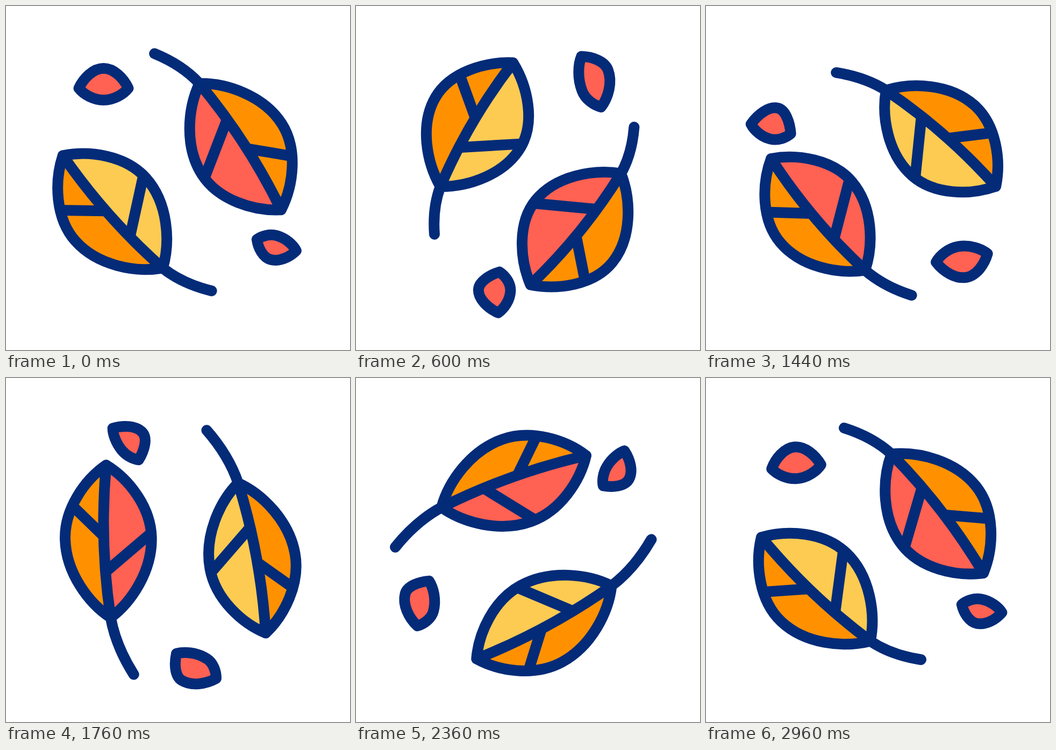
An HTML page for the animation above (3000 ms loop, 640x640 px).

```html
<!DOCTYPE html>
<html lang="en">
<head>
<meta charset="utf-8">
<title>Whirling leaves</title>
<style>
  html, body { margin: 0; width: 100%; height: 100%; overflow: hidden; background: #fff; }
  svg { display: block; width: 100%; height: 100%; }
  .line { fill: none; stroke: #042b78; stroke-width: 20; stroke-linejoin: round; }
  .round { stroke-linecap: round; }
</style>
</head>
<body>
<svg viewBox="-320 -320 640 640"><g id="wheel"></g></svg>
<script>
const LOOP = 3000, STEP = 40;
const RED = '#ff6152', ORANGE = '#ff9100', YELLOW = '#fdcb52';

// Sizes are measured from a shape's centre along its axis (tip, base) and
// to its two sides (near, far). A triple holds the values at each third of the loop.
const leafSize = {
  tip: [136, 132, 146], base: [144, 128, 142],
  near: [88, 94, 78], far: [88, 94, 78], peak: 0.48,
  stem: [92, 77, 112], hook: [40, 33, 41]
};
const bigPetal = {
  x: -138.5, y: -167, angle: [0, -5, 2],
  tip: 46, base: [46, 60, 38], near: 37, far: 22, peak: 0.5, lean: [0, 0.15, -0.15]
};
const smallPetal = {
  x: 185, y: 119, angle: [16, 22, 19], shift: [6, -6, 0],
  tip: 38, base: 38, near: [17, 24, 11], far: [29, 43, 37], peak: 0.45
};

const wheel = document.getElementById('wheel');

function add(parent, tag, attrs = {}) {
  const node = document.createElementNS('http://www.w3.org/2000/svg', tag);
  for (const key in attrs) node.setAttribute(key, attrs[key]);
  return parent.appendChild(node);
}

// Position along the axis: 0 at the tip, 1 at the base.
const along = (s, t) => t * (s.tip + s.base) - s.tip;

// One edge from tip to base, bulging to the given height at the peak.
function side(s, height, peak) {
  const x = t => along(s, t), rest = 1 - peak;
  return `M${x(0)} 0` +
    `C${x(0.19 * peak)} ${height / 2} ${x(0.58 * peak)} ${height} ${x(peak)} ${height}` +
    `C${x(1 - 0.58 * rest)} ${height} ${x(1 - 0.19 * rest)} ${height / 2} ${x(1)} 0`;
}

const nearSide = s => side(s, -s.near, s.peak - s.lean);
const farSide = s => side(s, s.far, s.peak + s.lean);

function leaf(color, place) {
  const group = add(wheel, 'g');
  const near = add(group, 'path', { fill: color });
  const far = add(group, 'path', { fill: ORANGE });
  const veins = add(group, 'path', { class: 'line' });
  const edge = add(group, 'path', { class: 'line round' });
  const bow = 17;

  function draw(s) {
    const x = t => along(s, t);
    const bend = `Q${x(0.5)} ${bow} `;
    const ribY = t => 2 * t * (1 - t) * bow;
    const vein = (t0, y0, t1) => `M${x(t0)} ${y0}L${x(t1)} ${ribY(t1)}`;
    const back = `${bend}${x(0)} 0Z`;
    const stem = `Q${s.base + s.stem / 2} ${-0.2 * s.hook} ${s.base + s.stem} ${-s.hook}`;

    near.setAttribute('d', nearSide(s) + back);
    far.setAttribute('d', farSide(s) + back);
    veins.setAttribute('d', vein(0.26, 0.81 * s.far, 0.465) + vein(0.453, -s.near, 0.7));
    edge.setAttribute('d', nearSide(s) + farSide(s) + `M${x(0)} 0${bend}${x(1)} 0${stem}`);
  }
  return { group, size: { ...leafSize, ...place }, draw };
}

function petal(size) {
  const group = add(wheel, 'g');
  const shape = add(group, 'path', { class: 'line round', style: `fill:${RED}` });
  return { group, size, draw: s => shape.setAttribute('d', nearSide(s) + farSide(s)) };
}

const shapes = [
  leaf(YELLOW, { x: -124, y: 60, angle: 48.4 }),
  leaf(RED, { x: 118, y: -55, angle: 237.1 }),
  petal(bigPetal),
  petal(smallPetal)
];

function render(ms) {
  const turn = ms / LOOP;
  const k = Math.floor(turn * 3), u = turn * 3 - k;
  const ease = u * u * (3 - 2 * u);
  const now = v => Array.isArray(v) ? v[k] + (v[(k + 1) % 3] - v[k]) * ease : v;

  wheel.setAttribute('transform', `rotate(${360 * turn})`);
  for (const { group, size, draw } of shapes) {
    const s = { lean: 0, shift: 0 };
    for (const key in size) s[key] = now(size[key]);
    group.setAttribute('transform',
      `translate(${s.x} ${s.y}) rotate(${s.angle}) translate(0 ${s.shift})`);
    draw(s);
  }
}

const began = performance.now();
function tick() {
  const step = Math.floor((performance.now() - began) / STEP + 0.05);
  render(step * STEP % LOOP);
  requestAnimationFrame(tick);
}
tick();
</script>
</body>
</html>
```
